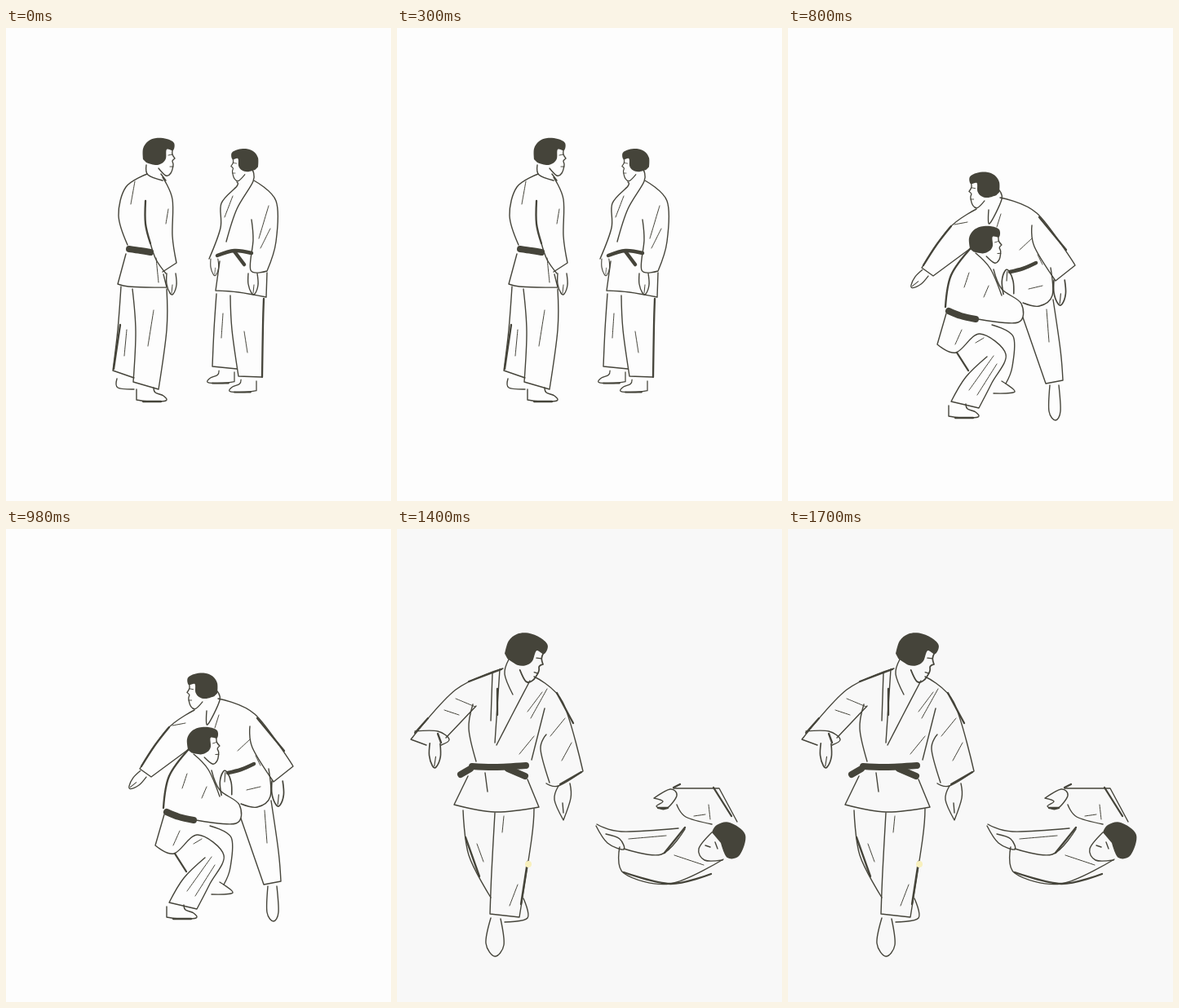
Write an HTML page with a canvas that moves like this. It is 472 px wide and 580 px high and loops after 1900 ms.

```html
<!DOCTYPE html>
<html lang="en">
<head>
<meta charset="utf-8">
<title>Judo throw</title>
<style>
html, body { margin: 0; width: 100%; height: 100%; overflow: hidden; background: #fdfdfd; }
canvas { display: block; }
</style>
</head>
<body>
<canvas width="472" height="580"></canvas>
<script>
const ctx = document.querySelector('canvas').getContext('2d');
const INK = '#45443a';
const PAPER = '#fdfdfd';
ctx.lineCap = ctx.lineJoin = 'round';

// Smooth curve through "x,y x,y ..." points; "!" marks a sharp corner
function trace(text) {
  const points = text.trim().split(/\s+/).map(pair => pair.split(',').map(parseFloat));
  const sharp = text.trim().split(/\s+/).map(pair => pair.endsWith('!'));
  const tangent = i => {
    const before = points[i - 1], after = points[i + 1];
    return sharp[i] || !before || !after ? [0, 0]
      : [(after[0] - before[0]) / 6, (after[1] - before[1]) / 6];
  };
  ctx.beginPath();
  ctx.moveTo(...points[0]);
  for (let i = 1; i < points.length; i++) {
    const [ax, ay] = points[i - 1], [bx, by] = points[i];
    const [ux, uy] = tangent(i - 1), [vx, vy] = tangent(i);
    ctx.bezierCurveTo(ax + ux, ay + uy, bx - vx, by - vy, bx, by);
  }
}
const pen = width => strokes => {
  ctx.lineWidth = width;
  ctx.strokeStyle = INK;
  for (const stroke of strokes.split(';')) { trace(stroke); ctx.stroke(); }
};
const fine = pen(1), line = pen(1.4), bold = pen(2.3), sash = pen(4.5), belt = pen(8);
function solid(shape) {
  trace(shape);
  ctx.fillStyle = INK;
  ctx.fill();
}

// A negative size mirrors the part
const part = draw => (x, y, size = 1, angle = 0) => {
  ctx.save();
  ctx.translate(x, y);
  ctx.rotate(angle);
  ctx.scale(size, Math.abs(size));
  draw();
  ctx.restore();
};
const head = part(() => {
  solid('-20,11 -20,-2 -14,-11 -4,-15 9,-14 18,-9 17,0 9,-1 8,10 3,16 -5,18 -16,15');
  line('16,0 16,5 19,10! 16,13 17,18 14,28 8,31 -1,22');
  fine('11,6 16,5; 13,20 17,20');
});
const hand = part(() => {
  line('-5,0 -5,13 -1,24 3,25 7,14 6,0');
  fine('2,14 1,24');
});
const foot = part(() => {
  line('0,0 0,13! 16,15 36,14 33,8 23,4 21,-2');
  bold('8,15 30,15');
});
const shaggyHair = part(() => {
  ctx.fillStyle = INK;
  ctx.beginPath();
  ctx.ellipse(0, 0, 18, 14, 0, 0, 7);
  ctx.fill();
  ctx.strokeStyle = PAPER;
  ctx.lineWidth = 1;
  for (let i = 0; i < 8; i++) {
    const x = -15 + i * 4, y = i % 2 ? -10 : 8;
    ctx.beginPath();
    ctx.moveTo(x, y);
    ctx.lineTo(x + 5, y - 6);
    ctx.stroke();
  }
});

function facing() {
  head(188, 150);
  line('172,168 174,180 192,187; 190,179 196,187');
  line('173,179 147,195 138,230 149,266; 192,183 204,210 204,255 209,288! 192,299');
  bold('171,212 171,240 177,264');
  line('177,264 184,284 196,301');
  belt('151,271 165,273 177,275');
  line('147,277 137,314! 150,317 172,318 197,318! 193,302');
  hand(202, 301);
  line('141,317 137,370 131,420! 157,429; 155,320 159,372 156,434! 187,443! 197,370 197,320');
  bold('140,364 132,418');
  fine('181,346 174,390; 158,188 153,216; 199,222 196,240; 148,370 145,402; 184,282 187,312');
  foot(160, 443);
  line('136,430 137,441 157,443');

  head(292, 161, -0.85);
  line('302,174 303,188 283,222 270,262; 283,189 283,194 264,215 263,245 249,283');
  line('304,187 331,212 331,262 320,298! 300,297 303,260 301,235');
  sash('259,279 280,273 301,276; 280,274 292,290');
  line('262,286 257,322! 285,324 319,330! 320,300');
  hand(302, 301);
  hand(255, 283, 0.8);
  line('258,326 255,370 253,415! 283,418; 275,328 277,370 285,427! 313,428');
  bold('316,332 315,365 314,428');
  fine('278,206 268,232; 322,218 310,258; 324,246 312,270; 266,350 264,380; 292,372 296,398');
  foot(280, 422, -0.9);
  foot(307, 433, -0.9);
}

function stepping() {
  head(166, 164);
  line('155,180 154,194 176,204; 172,194 176,204');
  line('154,194 121,225 122,255 130,276; 177,204 189,240 189,275 193,300! 192,320 173,318! 162,270 160,240');
  bold('121,244 130,275; 192,296 193,307');
  belt('132,281 143,283 153,284');
  line('130,287 125,328! 145,335 165,338 180,332');
  hand(186, 322);
  line('128,332 125,400 122,440! 146,444; 143,337 148,390 146,452! 177,457! 187,400 187,347');
  fine('173,378 161,430; 154,228 151,262; 181,242 172,267; 146,404 144,438; 157,345 156,362');
  foot(153, 459, 0.95);
  line('133,445 130,457 150,459');

  head(336, 184, -0.95);
  line('347,200 350,208; 330,214 345,206 356,210');
  line('330,214 308,234 299,272 287,304! 308,311! 330,265 333,233');
  hand(291, 309, 1.25, 0.5);
  line('354,209 375,234 410,268 423,288! 406,306! 384,289 367,270');
  hand(415, 298, 0.7, -1.1);
  line('373,236 370,260 358,291; 334,256 341,268');
  belt('325,294 340,297 354,295');
  line('318,299 302,338! 340,346 370,333! 358,300');
  line('296,340 281,390 275,441! 299,441! 318,392 351,345; 369,337 371,400 372,440! 350,438! 334,376 344,356');
  bold('346,350 324,384; 358,258 364,270');
  fine('378,248 388,258; 382,270 408,286; 350,262 342,280; 296,352 291,372; 350,392 354,416; 306,304 296,324');
  foot(297, 445, -1);
  foot(374, 446, -0.55);
  fine('425,435 432,433');
}

function entering() {
  head(240, 191, -0.95);
  line('258,198 262,210 247,240 246,223');
  line('231,222 198,245 164,294! 178,304! 224,270');
  bold('200,243 182,266 166,291');
  hand(168, 300, 0.95, 0.8);
  line('260,208 305,227 352,291! 328,310! 302,268 299,242');
  bold('308,232 341,272');
  hand(332, 309, 1.2);
  sash('272,299 288,295 304,288');
  line('322,294 324,328 308,341 288,337; 325,333 334,395 337,432! 316,436! 288,355');
  line('321,438 320,470 328,481 334,470 332,438');
  fine('204,241 220,238; 261,228 256,244; 299,258 284,272; 306,278 312,290; 295,320 312,316; 317,345 320,385');

  head(242, 258, 1, -0.1);
  bold('224,270 200,303 193,342; 207,398 221,420');
  line('230,276 248,295 262,328');
  belt('197,347 212,353 230,357');
  line('252,296 262,320 286,338 282,361 233,357');
  hand(271, 326, 1.15, 3.1);
  line('194,350 183,388! 206,398 235,375 267,400 250,435 234,466! 200,458! 218,428 244,403');
  line('250,364 276,378 275,415 267,436; 262,433 278,446 252,448');
  fine('252,402 222,444; 256,412 232,450; 213,370 205,388; 230,386 240,380; 246,316 240,330; 222,300 216,318');
  foot(197, 463, 1);
}

function falling() {
  line('72,237 67,204 74,190 82,194 81,236; 65,240 85,236! 98,282 118,340; 65,240 69,282 80,345');
  sash('72,195 79,193');
  bold('65,244 70,284; 110,308 117,336; 208,318 198,338');
  line('217,285 220,269 252,272! 235,278 220,291; 175,362 205,326 220,292! 196,287! 176,316 148,345');
  line('82,352 100,342 148,345 176,365! 165,380; 82,352 104,368');
  bold('104,368 135,380 163,387; 104,382 132,377');
  line('35,355 17,326 27,321 43,351; 70,412 50,386 33,357! 64,343! 97,380');
  bold('18,325 25,338; 34,358 64,404');
  line('74,415 98,436; 103,440 133,465 170,471 218,474! 217,448! 195,446; 107,385 118,410 110,438; 142,454 132,432! 153,424');
  bold('141,387 149,418');
  shaggyHair(172, 432, 1);
  line('152,424 165,412 187,420');
  line('219,447 240,442 262,449 257,462 220,459');
  sash('240,447 257,449; 239,457 254,458');
  fine('204,302 194,322; 90,292 92,312; 80,380 92,394; 130,354 144,352; 122,386 126,420');

  line('248,341 197,347 191,356 205,361 236,355; 248,341! 236,354 254,374');
  shaggyHair(238, 385, 0.95, 1.4);
  line('222,374 219,397 223,403 198,440! 220,446; 255,382 246,420 224,424');
  bold('248,341 278,362 288,405; 192,350 232,342');
  sash('289,407 302,436 291,462');
  line('258,463 290,464; 295,410 325,415 328,435 329,463! 295,463');
  line('290,403 345,371 366,378 395,404! 388,420 360,405; 358,372 358,405 331,440');
  bold('294,400 330,378; 346,426 330,439');
  line('395,410 425,403! 415,423 402,430 394,424; 337,371 352,354 351,370');
  fine('262,362 272,376 266,386; 262,402 252,426; 246,404 242,416; 326,394 318,406; 346,382 352,398');
}

function standing() {
  head(160, 147, 1.25, 0.3);
  line('137,160 132,178 142,203');
  line('130,171 72,197 17,258! 36,265; 22,248 50,248 64,258 54,265; 60,256 97,217');
  bold('128,172 88,187; 38,232 22,250; 50,251 54,262');
  hand(46, 263, 1.15, 0.05);
  line('126,172 120,262; 163,186 140,230 122,265; 117,176 115,235');
  line('168,181 203,212 228,297! 198,315 183,312; 183,252 176,270 187,311; 93,215 88,245 97,285; 181,220 165,283');
  bold('196,201 216,238; 123,196 123,228; 226,298 200,313');
  fine('72,208 96,218; 58,222 76,228; 184,196 164,232; 206,232 188,254; 214,262 202,284; 178,200 160,224; 168,254 150,276');
  belt('92,291 120,292 158,290; 90,294 78,301; 136,294 157,303');
  line('87,303 70,338! 120,347 174,341! 160,307; 108,299 111,322');
  line('198,315 193,332 204,357! 213,330 212,312; 203,336 204,348');
  line('81,345 88,400 115,452; 120,348 116,420 114,472! 150,476! 165,380 168,343');
  bold('84,378 101,426; 160,408 152,460');
  fine('131,352 129,372; 98,386 106,408; 148,436 138,462');
  line('115,477 109,508 120,524 131,510 127,478; 155,453 160,477 132,482');
  ctx.fillStyle = '#f8f0bd';
  ctx.beginPath();
  ctx.arc(161, 411, 4, 0, 7);
  ctx.fill();

  solid('386,372 392,363 408,360 427,375 420,400 405,403 397,385');
  line('386,372 370,392 377,406 399,406; 378,388 384,390; 390,384 393,392');
  line('273,390 278,422 335,435 400,405');
  bold('278,421 335,435 385,423');
  line('245,362 275,371 345,367; 244,364 258,385 278,393 273,380 256,374; 278,392 324,399 353,368');
  line('315,330 335,319 343,327 330,343 318,340 326,334 315,330; 343,338 354,353 386,362; 339,318 395,318! 417,359');
  bold('353,366 328,397; 320,342 332,342; 339,317 347,313; 388,317 410,352');
  fine('382,338 384,356; 364,352 378,350; 284,380 330,376; 340,400 376,412');
}

const poses = [
  { until: 500, draw: facing },
  { until: 800, draw: stepping },
  { until: 1100, draw: entering },
  { until: 1400, draw: falling },
  { until: 1900, draw: standing, paper: '#f8f8f8' },
];
let shown;
function frame() {
  const time = performance.now() % 1900;
  const pose = poses.find(p => time < p.until);
  if (pose !== shown) {
    shown = pose;
    ctx.fillStyle = pose.paper || PAPER;
    ctx.fillRect(0, 0, 472, 580);
    pose.draw();
  }
  requestAnimationFrame(frame);
}
frame();
</script>
</body>
</html>
```
